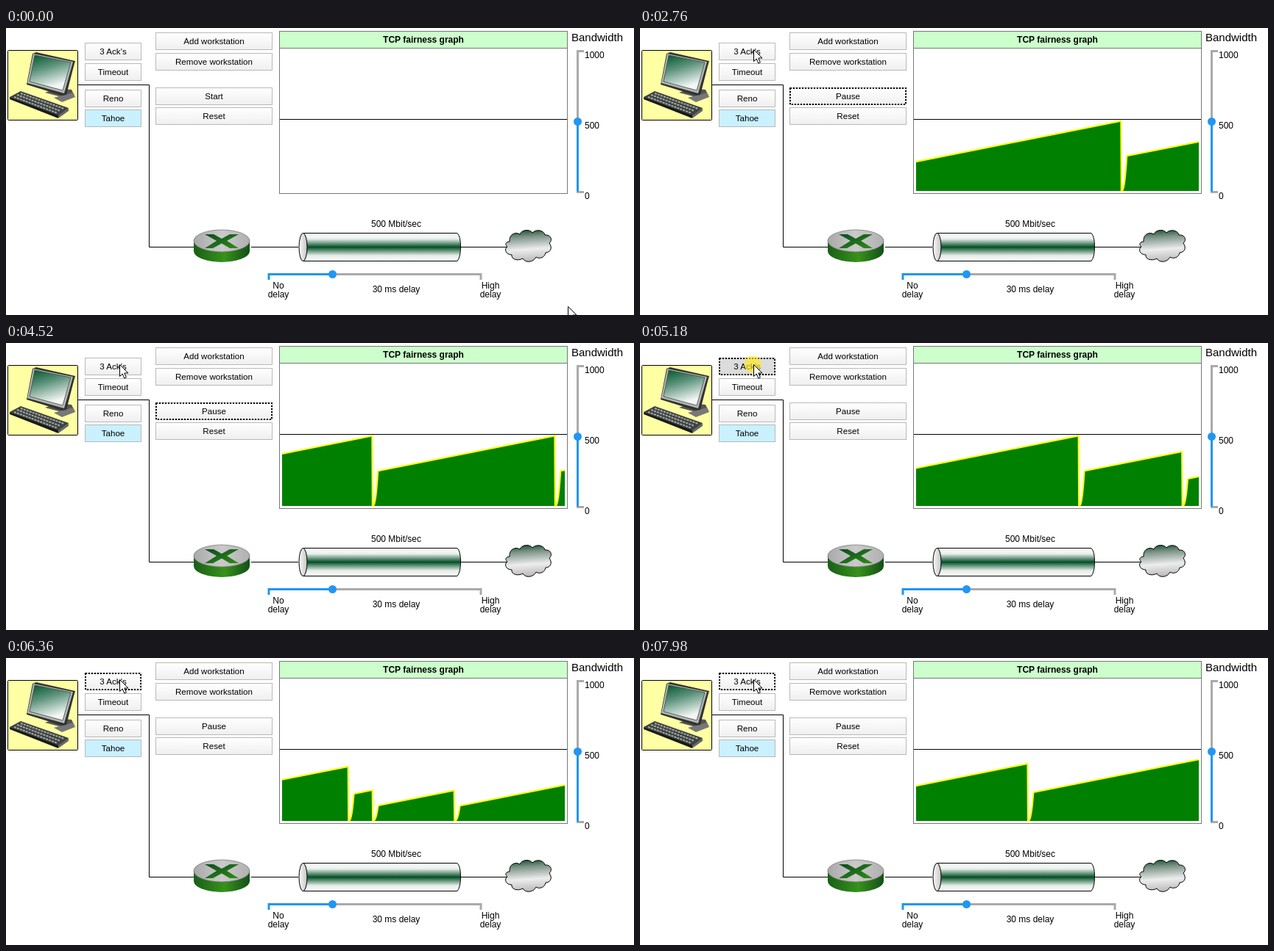
These frames come from a looping animation (853 px wide and 391 px high, 8000 ms). An HTML page:

```html
<!DOCTYPE html>
<html lang="en">
<head>
<meta charset="utf-8">
<title>TCP fairness graph</title>
<style>
html, body { margin: 0; width: 100%; height: 100%; overflow: hidden; background: #fff; }
svg { display: block; width: 853px; height: 391px; }
text { font: 12px "Liberation Sans", Arial, sans-serif; fill: #000; }
.mid { text-anchor: middle; }
.btn text { font-size: 11.6px; text-anchor: middle; }
.btn rect { stroke: #b9b9b9; }
.wire { fill: none; stroke: #000; }
</style>
</head>
<body>
<svg viewBox="0 0 853 391" xmlns="http://www.w3.org/2000/svg">
  <defs>
    <linearGradient id="face" x2="0" y2="1"><stop stop-color="#fff"/><stop offset="1" stop-color="#efefef"/></linearGradient>
    <linearGradient id="screen" x1=".25" x2=".6" y2="1"><stop stop-color="#0f6137"/><stop offset=".35" stop-color="#5b917b"/><stop offset=".9" stop-color="#f4f7f5"/></linearGradient>
    <linearGradient id="pipe" x2="0" y2="1">
      <stop stop-color="#fff"/><stop offset=".2" stop-color="#eaf1ed"/><stop offset=".5" stop-color="#045027"/>
      <stop offset=".8" stop-color="#e4ece7"/><stop offset="1" stop-color="#fff"/>
    </linearGradient>
    <linearGradient id="cap"><stop stop-color="#fafafa"/><stop offset="1" stop-color="#c4c4c4"/></linearGradient>
    <linearGradient id="top"><stop stop-color="#a9a9a9"/><stop offset=".5" stop-color="#cacaca"/><stop offset="1" stop-color="#b0b0b0"/></linearGradient>
    <linearGradient id="side"><stop stop-color="#185f17"/><stop offset=".55" stop-color="#37921a"/><stop offset="1" stop-color="#124f18"/></linearGradient>
    <linearGradient id="cross" x2="1" y2="1"><stop stop-color="#0d4a22"/><stop offset="1" stop-color="#2f8d14"/></linearGradient>
    <linearGradient id="sky" x2=".1" y2="1"><stop stop-color="#0d4c2b"/><stop offset=".25" stop-color="#7d9387"/><stop offset=".65" stop-color="#ededed"/><stop offset="1" stop-color="#bdbdbd"/></linearGradient>
    <clipPath id="plot"><rect x="375" y="28" width="384" height="194.5"/></clipPath>
  </defs>

  <path class="wire" d="M98 77.5H194.5V298.5H256M333 298.5H397M617 298.5H681"/>

  <g id="computer">
    <rect x="2.5" y="30.5" width="95" height="95" rx="1" fill="#ffffa3" stroke="#000"/>
    <path d="M53 88L83 96L93 92L89 84L70 82Z" fill="#555"/>
    <path d="M65 95L91 88L94 94L76 101Z" fill="#777"/>
    <path d="M36 35L41 33L94 45L92 52L82 91L76 92L28 77Z" fill="#303331"/>
    <path d="M37 35L91 46L79 89L29 75Z" fill="#b5b9b6"/>
    <path d="M39 37L88 47L77 85L32 73Z" fill="url(#screen)" stroke="#444" stroke-width=".8"/>
    <path d="M5 94L20 86L85 109L71 121Z" fill="#3e4240"/>
    <path d="M5 94L71 119V123L5 97Z" fill="#171a18"/>
    <path d="M71 119L85 109V113L71 123Z" fill="#646866"/>
    <path d="M11 94L70 116M15 91L74 113M20 89L79 110" stroke="#a4a9a6" stroke-width="2" stroke-dasharray="3 1.2"/>
  </g>

  <g id="router">
    <path d="M255 290V304A38 15 0 0 0 331 304V290Z" fill="url(#side)"/>
    <ellipse cx="293" cy="290" rx="38" ry="15" fill="url(#top)" stroke="#777" stroke-width=".8"/>
    <path d="M270 281H282L293 287L304 281H316L300 290L316 300H304L293 293.500L281 300H270L286 290Z" fill="url(#cross)"/>
  </g>

  <g stroke="#000">
    <path d="M403 279.500H613Q617.500 284 617.500 298T613 317.500H403Z" fill="url(#pipe)"/>
    <ellipse cx="403.500" cy="298.500" rx="5.500" ry="19" fill="url(#cap)"/>
    <path fill="url(#sky)" d="M684 291C683 281 692 277 698 281C701 274 712 274 715 279C721 273 731 276 732 282C740 281 743 289 738 293C743 300 739 306 733 306C732 313 724 315 720 312C716 320 705 320 702 314C695 318 686 315 687 309C679 309 676 301 681 298C677 295 679 291 684 291Z"/>
  </g>

  <g stroke-width="3" fill="none">
    <path d="M785 31.500H776.500V223.500H785" stroke="#aaa"/>
    <path d="M776.500 128V223" stroke="#2196f3"/>
    <path d="M443 335.500H645V343" stroke="#aaa"/>
    <path d="M357 343V335.500H443" stroke="#2196f3"/>
  </g>
  <g fill="#2196f3"><circle cx="776.500" cy="127.500" r="5.500"/><circle cx="443.500" cy="335.500" r="5.500"/></g>

  <text x="768" y="18" style="font-size:15px">Bandwidth</text>
  <text x="786" y="41">1000</text><text x="786" y="137">500</text><text x="786" y="233">0</text>
  <g class="mid">
    <text x="530" y="271">500 Mbit/sec</text>
    <text x="530" y="360">30 ms delay</text>
    <text x="370" y="355">No</text><text x="370" y="367">delay</text>
    <text x="658" y="355">High</text><text x="658" y="367">delay</text>
  </g>

  <rect x="371.500" y="4.500" width="391" height="221" fill="#fff" stroke="#777"/>
  <rect x="371.500" y="4.500" width="391" height="23" fill="#cfc" stroke="#777"/>
  <text class="mid" x="567" y="20" style="font-weight:bold">TCP fairness graph</text>
  <path class="wire" d="M372 124.500H762"/>
  <g clip-path="url(#plot)">
    <path id="area" fill="#008000"/>
    <path id="curve" fill="none" stroke="#ff0" stroke-width="2"/>
  </g>

  <g id="buttons"></g>
  <rect id="focus" fill="none" stroke="#000" stroke-width="2" stroke-dasharray="2 2"/>
  <circle id="flash" r="11.500" fill="#ffe91a" fill-opacity=".65"/>
  <path id="pointer" d="M.5 .5V16.500L4.200 13L6.800 19L9.400 17.900L6.800 12H12Z" fill="#fff" stroke="#000"/>
</svg>
<script>
const LOOP = 8000, LEFT = 375, WIDTH = 384, BASE = 222;
const SLOPE = 0.199, RISE = 8;
const START = 702;
const ackClicks = [5081, 5227, 5715, 6988];
const drops = [372.5, 620.5, 868.5, 1009, 1042, 1153, 1448.5];
const $ = id => document.getElementById(id);

function lerp(keys, t, col = 1, ease = x => x) {
  if (t <= keys[0][0]) return keys[0][col];
  for (let i = 1; i < keys.length; i++) {
    const a = keys[i - 1], b = keys[i];
    if (t < b[0]) return a[col] + (b[col] - a[col]) * ease((t - a[0]) / (b[0] - a[0]));
  }
  return keys[keys.length - 1][col];
}
const smooth = x => x * x * (3 - 2 * x);

// time -> length of the trace
const progress = [[START, 0], [1240, 125], [2760, 478], [4520, 882], [5790, 1170], [6980, 1448], [8000, 1685.5]];
// time -> pointer tip
const route = [[50, 763, 379], [600, 308, 93], [840, 308, 93], [1200, 160, 27], [1260, 160, 27], [1420, 154, 29]];

function addButton(x, y, w, label, fill = 'url(#face)') {
  const g = document.createElementNS('http://www.w3.org/2000/svg', 'g');
  g.setAttribute('class', 'btn');
  g.innerHTML = `<rect x="${x + .5}" y="${y + .5}" width="${w - 1}" height="23" fill="${fill}"/>
    <text x="${x + w / 2}" y="${y + 16}">${label}</text>`;
  $('buttons').append(g);
  return { x, y, w, face: g.firstElementChild, text: g.lastElementChild };
}
const ack = addButton(107, 20, 77, "3 Ack's");
addButton(107, 48, 77, 'Timeout');
addButton(107, 84, 77, 'Reno');
addButton(107, 111, 77, 'Tahoe', '#c9f1ff');
addButton(203, 6, 159, 'Add workstation');
addButton(203, 34, 159, 'Remove workstation');
const run = addButton(203, 81, 159, 'Start');
addButton(203, 108, 159, 'Reset');

// Congestion window: slow start up to the threshold, then linear growth
const trace = [];
function slowStart(s, top) {
  for (let i = 0; i <= RISE; i++) trace.push([s + .7 + (RISE - .7) * i / RISE, top * (i / RISE) ** 2.5]);
}
for (let i = 0; i <= 6; i++) trace.push([i, 50 * (i / 6) ** 2.5]);
trace.push([6.5, 0]);
slowStart(6.5, 24);
let from = 14.5, height = 24;
for (const s of drops) {
  height += (s - from) * SLOPE;
  trace.push([s, height], [s + .5, 0]);
  height /= 2;
  slowStart(s, height);
  from = s + RISE;
}
trace.push([1700, height + (1700 - from) * SLOPE]);

function drawGraph(edge) {
  const shift = LEFT - Math.max(0, edge - WIDTH);
  const points = trace.filter(p => p[0] < edge);
  if (edge > 0) points.push([edge, lerp(trace, edge)]);
  const line = points.map(([s, h]) => `${(s + shift).toFixed(2)} ${(BASE - h).toFixed(2)}`).join('L');
  $('curve').setAttribute('d', line && 'M' + line);
  $('area').setAttribute('d', line && `M${shift} ${BASE}L${line}V${BASE}Z`);
}

function attrs(el, values) {
  for (const k in values) el.setAttribute(k, values[k]);
}

function draw(t) {
  drawGraph(lerp(progress, t));

  const x = lerp(route, t, 1, smooth), y = lerp(route, t, 2, smooth);
  $('pointer').setAttribute('transform', `translate(${Math.round(x)} ${Math.round(y)})`);

  const running = t >= START;
  run.text.textContent = running ? 'Pause' : 'Start';
  const pressed = c => t >= c - 70 && t < c + 10;
  const down = ackClicks.some(pressed);
  ack.face.setAttribute('fill', down ? '#dcdcdc' : 'url(#face)');
  run.face.setAttribute('fill', pressed(START) ? '#dcdcdc' : 'url(#face)');

  const target = t >= ackClicks[0] - 70 ? ack : run;
  attrs($('focus'), {
    x: target.x + 1, y: target.y + 1, width: target.w - 2, height: 22,
    visibility: t >= START - 70 ? 'visible' : 'hidden'
  });

  const lit = [START, ...ackClicks].some(c => t >= c - 80 && t < c + 60);
  attrs($('flash'), { cx: x - 1, cy: y, visibility: lit ? 'visible' : 'hidden' });
}

const begin = performance.now();
function tick(now) {
  draw(Math.max(0, now - begin) % LOOP);
  requestAnimationFrame(tick);
}
draw(0);
requestAnimationFrame(tick);
</script>
</body>
</html>
```
